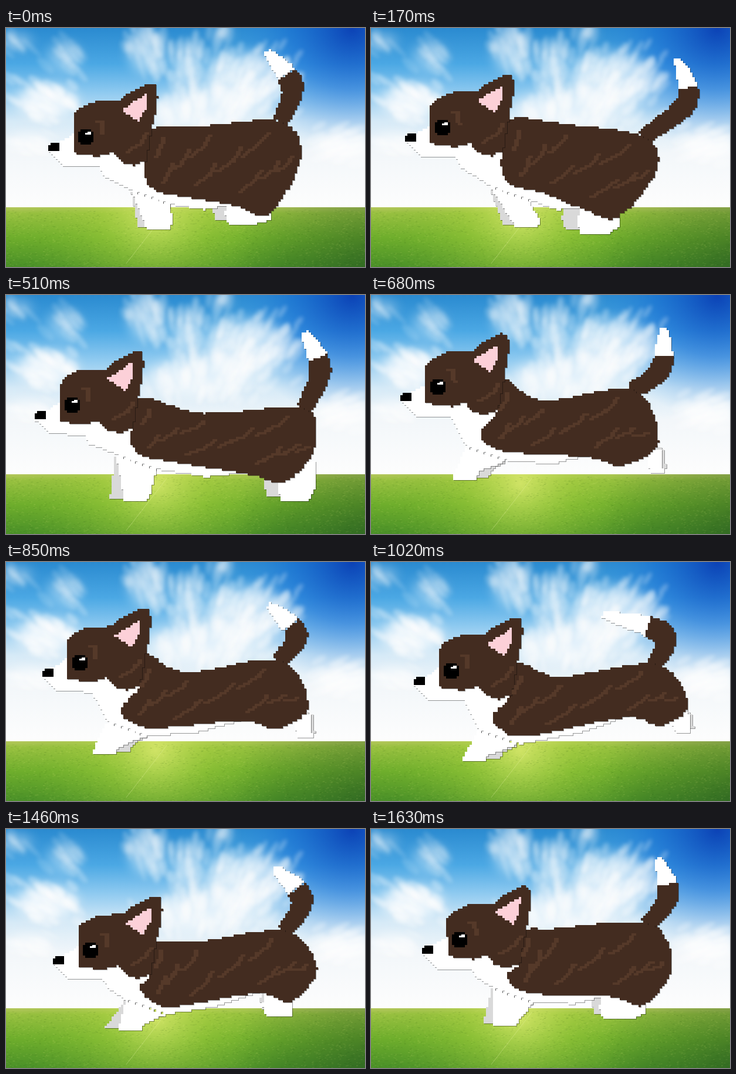
An HTML page with a canvas that plays this animation: 612x408 px, repeating every 1800 ms.

```html
<!DOCTYPE html>
<html lang="en">
<head>
<meta charset="utf-8">
<title>Running corgi</title>
<style>
html, body { margin: 0; width: 100%; height: 100%; overflow: hidden; background: #fff; }
canvas { position: absolute; left: 0; top: 0; }
</style>
</head>
<body>
<canvas id="scene" width="612" height="408"></canvas>
<canvas id="dog" width="612" height="408"></canvas>
<script>
const LOOP = 1800, CELL = 4;
const BROWN = '#432c20', STRIPE = '#553929', GRAY = '#d9d9d9', WHITE = '#fff';
const scene = document.getElementById('scene').getContext('2d');
const ctx = document.getElementById('dog').getContext('2d');

// ---- Meadow and sky ----
let seed = 7;
const rand = () => (seed = seed * 16807 % 2147483647) / 2147483647;
const spread = size => (rand() + rand() - 1) * size * .6;

function fill(g, stops, y, h) {
  stops.forEach(([at, color]) => g.addColorStop(at, color));
  scene.fillStyle = g;
  scene.fillRect(0, y, 612, h);
}
const vertical = (y0, y1) => scene.createLinearGradient(0, y0, 0, y1);
const radial = (x, y, r) => scene.createRadialGradient(x, y, 0, x, y, r);

// A cloud is a soft core with small streaks that radiate from the horizon.
function cloud(x, y, w, h, alpha) {
  const puff = (cx, cy, rx, ry, tilt, a) => {
    scene.fillStyle = `rgba(255,255,255,${a})`;
    scene.beginPath();
    scene.ellipse(cx, cy, rx, ry, tilt, 0, 7);
    scene.fill();
  };
  scene.filter = 'blur(10px)';
  puff(x, y, w * .4, h * .4, 0, alpha);
  scene.filter = 'blur(3px)';
  for (let i = 0; i < w * h / 220; i++) {
    const cx = x + spread(w), cy = y + spread(h);
    puff(cx, cy, 10 + rand() * 14, 3 + rand() * 5, Math.atan2(cy - 290, cx - 306), alpha * .4);
  }
  scene.filter = 'none';
}

function drawScene() {
  fill(vertical(0, 306), [[0, '#2a8ad0'], [.2, '#4ba8e4'], [.36, '#8fcaf0'],
    [.52, '#d6eaf7'], [.7, '#f3f7fa'], [1, '#fdfdfd']], 0, 306);
  fill(radial(590, 0, 210), [[0, 'rgba(10,62,180,.95)'], [.5, 'rgba(20,105,210,.55)'],
    [1, 'rgba(60,150,225,0)']], 0, 306);

  cloud(70, 125, 130, 70, .75);
  cloud(40, 195, 90, 36, .6);
  cloud(20, 22, 60, 30, .4);
  cloud(100, 50, 70, 60, .35);
  cloud(240, 40, 80, 90, .5);
  cloud(310, 65, 60, 100, .5);
  cloud(410, 90, 180, 120, .65);
  cloud(365, 10, 50, 30, .4);
  cloud(330, 140, 220, 80, .6);
  cloud(575, 200, 120, 60, .7);

  fill(vertical(306, 408), [[0, '#b4c75c'], [.1, '#98c040'], [.5, '#6fae2c'], [1, '#4a9028']], 306, 102);
  fill(radial(255, 322, 230), [[0, 'rgba(228,240,115,.75)'], [.4, 'rgba(175,215,65,.4)'],
    [1, 'rgba(120,180,45,0)']], 306, 102);
  fill(radial(640, 430, 260), [[0, 'rgba(25,70,30,.6)'], [1, 'rgba(40,90,30,0)']], 306, 102);
  for (let i = 0; i < 2500; i++) {
    scene.fillStyle = rand() < .5 ? 'rgba(255,255,150,.1)' : 'rgba(20,70,0,.1)';
    scene.fillRect(rand() * 612, 310 + rand() * 98, 3, 1);
  }
  scene.strokeStyle = 'rgba(235,245,170,.35)';
  scene.beginPath();
  scene.moveTo(274, 313);
  scene.lineTo(205, 402);
  scene.stroke();
}

// ---- Key poses: joints of the rig; the third number of a foot moves the far leg ----
const stand = {
  eye: [136, 186], back: [345, 166], base: [468, 160], bend: [488, 98], tip: [444, 39],
  rump: [503, 222], haunch: [450, 317], elbow: [255, 277], fore: [258, 343, -14], hind: [402, 334, -22]
};
const gather = {
  eye: [122, 170], back: [330, 164], base: [465, 186], bend: [539, 125], tip: [522, 52],
  rump: [487, 245], haunch: [422, 323], elbow: [242, 269], fore: [264, 339, -20], hind: [380, 350, -26]
};
const push = {
  eye: [113, 188], back: [335, 202], base: [508, 194], bend: [536, 128], tip: [507, 62],
  rump: [524, 268], haunch: [474, 320], elbow: [230, 273], fore: [220, 353, -24], hind: [492, 350, -24]
};
const leap = {
  eye: [114, 157], back: [290, 180], base: [446, 162], bend: [494, 126], tip: [498, 54],
  rump: [490, 250], haunch: [432, 291], elbow: [205, 259], fore: [157, 314, 22], hind: [490, 304, 4]
};
const stretch = {
  eye: [137, 186], back: [320, 196], base: [485, 174], bend: [498, 122], tip: [394, 89],
  rump: [540, 244], haunch: [495, 279], elbow: [225, 287], fore: [174, 341, 26], hind: [532, 293, 5]
};
const land = {
  eye: [137, 225], back: [330, 217], base: [479, 186], bend: [504, 126], tip: [422, 79],
  rump: [547, 246], haunch: [505, 289], elbow: [244, 313], fore: [190, 355, -26], hind: [513, 317, 6]
};
const rise = {
  eye: [151, 189], back: [310, 170], base: [472, 162], bend: [506, 114], tip: [490, 49],
  rump: [513, 235], haunch: [468, 300], elbow: [250, 272], fore: [228, 336, -18], hind: [418, 325, -14]
};

const mix = (a, b, t) => a.map((v, i) => v + (b[i] - v) * t);
const between = (a, b) => Object.fromEntries(Object.keys(a).map(k => [k, mix(a[k], b[k], .5)]));
const steps = [
  [0, stand], [170, gather], [340, between(gather, push)], [510, push], [680, leap],
  [850, between(leap, stretch)], [1020, stretch], [1190, between(stretch, land)],
  [1290, land], [1460, between(land, rise)], [1630, rise]
];

// ---- Geometry ----
const near = ([x, y], dx, dy) => [x + dx, y + dy];
const around = (p, offsets) => offsets.map(([dx, dy]) => near(p, dx, dy));

// Catmull-Rom point at u, counted in whole points.
function curve(points, u, closed) {
  const n = points.length, i = Math.floor(u), t = u - i;
  const at = k => points[closed ? (k + n) % n : Math.min(Math.max(k, 0), n - 1)];
  const [a, b, c, d] = [at(i - 1), at(i), at(i + 1), at(i + 2)];
  return b.map((v, k) => v + t / 2 * (c[k] - a[k] +
    t * (2 * a[k] - 5 * v + 4 * c[k] - d[k] + t * (3 * (v - c[k]) + d[k] - a[k]))));
}
const closedCurve = points =>
  Array.from({ length: points.length * 6 }, (_, i) => curve(points, i / 6, true));

// Outline of a tail section: thin at the root, full at the bend, pointed at the tip.
function tube(spine, from, to) {
  const left = [], right = [];
  for (let i = 0; i <= 8; i++) {
    const u = from + (to - from) * i / 8;
    const [x, y] = curve(spine, u), [x2, y2] = curve(spine, u + .01), [x1, y1] = curve(spine, u - .01);
    const r = (u < 1 ? 14 + 5 * u : 19 - 15 * (u - 1) ** 1.5) / (Math.hypot(x2 - x1, y2 - y1) || 1);
    left.push([x + (y2 - y1) * r, y - (x2 - x1) * r]);
    right.unshift([x - (y2 - y1) * r, y + (x2 - x1) * r]);
  }
  return left.concat(right);
}

// ---- Pixel-style drawing ----
const snap = v => Math.round(v / CELL) * CELL;

// Visits the grid cells along the line between two points.
function walk([x0, y0], [x1, y1], visit) {
  const n = Math.ceil(Math.max(Math.abs(x1 - x0), Math.abs(y1 - y0)) / CELL) || 1;
  for (let i = 1; i <= n; i++) {
    visit(snap(x0 + (x1 - x0) * i / n), snap(y0 + (y1 - y0) * i / n));
  }
}

function shape(color, points) {
  let y = snap(points[0][1]);
  ctx.beginPath();
  ctx.moveTo(snap(points[0][0]), y);
  points.forEach((p, i) => walk(p, points[(i + 1) % points.length], (nx, ny) => {
    ctx.lineTo(nx, y);
    ctx.lineTo(nx, y = ny);
  }));
  ctx.fillStyle = color;
  ctx.fill();
}

function rects(color, [x, y], list) {
  ctx.fillStyle = color;
  list.forEach(([dx, dy, w, h]) => ctx.fillRect(Math.round(x) + dx, Math.round(y) + dy, w, h));
}

function stripe(points) {
  points.slice(1).forEach((p, i) =>
    walk(points[i], p, (x, y) => rects(STRIPE, [x, y], [[-4, -2, 8, CELL]])));
}

// ---- The dog ----
const foreLeg = (elbow, foot) => [
  near(elbow, -43, 0), ...around(foot, [[-19, 0], [19, 0], [25, -12]]), near(elbow, 26, 24)];

function hindLeg(foot, heel, half) {
  return [...around(foot, [[-half, -45], [-half - 6, -16], [-half, 0], [half, 0]]),
    [heel[0], heel[1] + (foot[1] - heel[1]) * .6], heel];
}

function drawDog({ eye, back, base, bend, tip, rump, haunch, elbow, fore, hind }) {
  const neck = near(eye, 112, -14), shoulder = near(eye, 101, 40);
  const thigh = near(haunch, -58, -14), belly = near(elbow, 45, 10), chest = near(elbow, -18, -24);
  const heel = hind[0] > haunch[0] ? near(rump, 4, 14) : haunch;
  const half = hind[2] < 0 ? 23 : 14;
  const spine = [base, bend, tip];

  ctx.clearRect(0, 0, 612, 408);
  ctx.shadowColor = 'rgba(0,0,0,.4)';
  ctx.shadowOffsetX = ctx.shadowOffsetY = 1;
  shape(GRAY, foreLeg(elbow, near(fore, fore[2], -4)));
  shape(GRAY, hindLeg(near(hind, hind[2], -8), near(heel, hind[2], 0), half));
  shape(WHITE, [
    ...around(eye, [[-14, -14], [-24, -2], [-46, 10], [-64, 26], [-40, 49], [20, 51], [28, 66]]),
    near(elbow, -43, 0), near(elbow, 26, 24), near(mix(elbow, thigh, .6), 0, 18),
    near(thigh, 10, -6), shoulder]);
  shape(WHITE, foreLeg(elbow, fore));
  shape(WHITE, hindLeg(hind, heel, half));
  shape(WHITE, tube(spine, 1.28, 1.99));

  shape(BROWN, tube(spine, .01, 1.3));
  shape(BROWN, closedCurve([neck, back, base, rump, haunch, thigh, belly, elbow, chest, shoulder]));
  shape(BROWN, around(eye, [
    [-20, 26], [-22, -38], [-12, -49], [12, -60], [56, -62], [68, -74], [104, -92], [118, -90],
    [122, -68], [118, -40], [112, -10], [103, 40], [84, 48], [62, 42], [48, 26], [24, 33], [-8, 29]]));

  ctx.shadowColor = 'transparent';
  const top = [neck, back, base, rump], bottom = [elbow, belly, thigh, haunch];
  const inside = (u, v) => mix(curve(top, u * 3), curve(bottom, u * 3), v);
  for (let i = 0; i < 10; i++) {
    const u = .1 + i * .088, v = .12 + .2 * (i * 2 % 3);
    stripe([inside(u, v), inside(u - .01, v + .16), inside(u - .06, v + .32)]);
  }
  stripe(around(eye, [[14, -28], [26, -28], [28, -8]]));
  stripe(around(eye, [[106, -8], [94, 10], [70, 24]]));

  shape('#fcd0d8', around(eye, [[59, -47], [104, -75], [102, -46], [91, -26]]));
  rects('#000', eye, [[-9, -13, 18, 26], [-13, -9, 26, 18]]);
  rects(WHITE, eye, [[3, -9, 6, 5], [-1, -7, 4, 3]]);
  rects('#000', near(eye, -64, 10), [[4, 0, 15, 4], [0, 4, 19, 10]]);
}

let shown;
function tick(now) {
  const t = now % LOOP;
  const current = steps.filter(([start]) => start <= t).pop()[1];
  if (current !== shown) drawDog(shown = current);
  requestAnimationFrame(tick);
}

drawScene();
drawDog(shown = stand);
requestAnimationFrame(tick);
</script>
</body>
</html>
```
